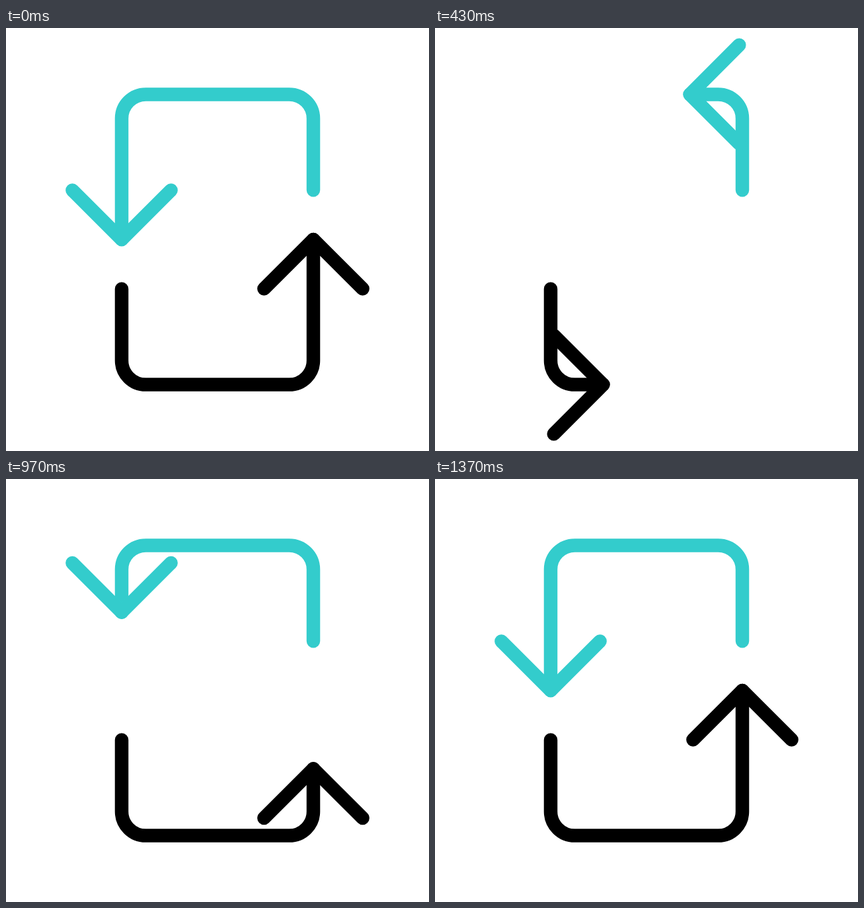
Write an HTML page that moves like this. It is 640x640 px and loops after 2000 ms.

```html
<!DOCTYPE html>
<html lang="en">
<head>
<meta charset="utf-8">
<title>Loop arrows</title>
<style>
  html, body { margin: 0; width: 100%; height: 100%; overflow: hidden; background: #fff; }
  svg { display: block; width: 100vw; height: 100vh; }
  path { fill: none; stroke-width: 20.5; stroke-linecap: round; stroke-linejoin: round; }
</style>
</head>
<body>
<svg viewBox="0 0 640 640">
  <defs>
    <g id="arrow">
      <path id="shaft" d="M465 245.3V136.9A36.5 36.5 0 0 0 428.5 100.4H211.5A36.5 36.5 0 0 0 175 136.9V320"/>
      <path id="head" d="M-74.6 -74.6L0 0L-74.6 74.6"/>
    </g>
  </defs>
  <use href="#arrow" stroke="#33cccc"/>
  <use href="#arrow" stroke="#000" transform="rotate(180 320 320)"/>
</svg>
<script>
const LOOP = 2000;
const FPS = 30;
const shaft = document.getElementById('shaft');
const head = document.getElementById('head');
const total = shaft.getTotalLength();

const smooth = u => u * u * (3 - 2 * u);
const easeIn = p => u => u ** p;
const easeOut = p => u => 1 - (1 - u) ** p;

// [end step, pulled-back length, easing]: pull back, fall, two bounces
const moves = [
  [12.25, 415, smooth],
  [23.24, 0, easeIn(2.6)],
  [28.95, 118.4, easeOut(2.2)],
  [34.78, 0, easeIn(2.2)],
  [37.8, 30, easeOut(2)],
  [40.9, 0, easeIn(2)]
];

function pulledBack(step) {
  let start = 0, from = 0;
  for (const [end, to, ease] of moves) {
    if (step < end) return from + (to - from) * ease((step - start) / (end - start));
    start = end;
    from = to;
  }
  return 0;
}

function draw(ms) {
  const step = Math.floor((ms % LOOP) * FPS / 1000 + 0.15);
  const len = total - pulledBack(step);
  const tip = shaft.getPointAtLength(len);
  const back = shaft.getPointAtLength(len - 0.5);
  const ahead = shaft.getPointAtLength(Math.min(total, len + 0.5));
  const angle = Math.atan2(ahead.y - back.y, ahead.x - back.x) * 180 / Math.PI;
  shaft.setAttribute('stroke-dasharray', `${len} ${total * 2}`);
  head.setAttribute('transform', `translate(${tip.x} ${tip.y}) rotate(${angle})`);
}

const begin = performance.now();
function tick() {
  draw(performance.now() - begin);
  requestAnimationFrame(tick);
}
tick();
</script>
</body>
</html>
```
